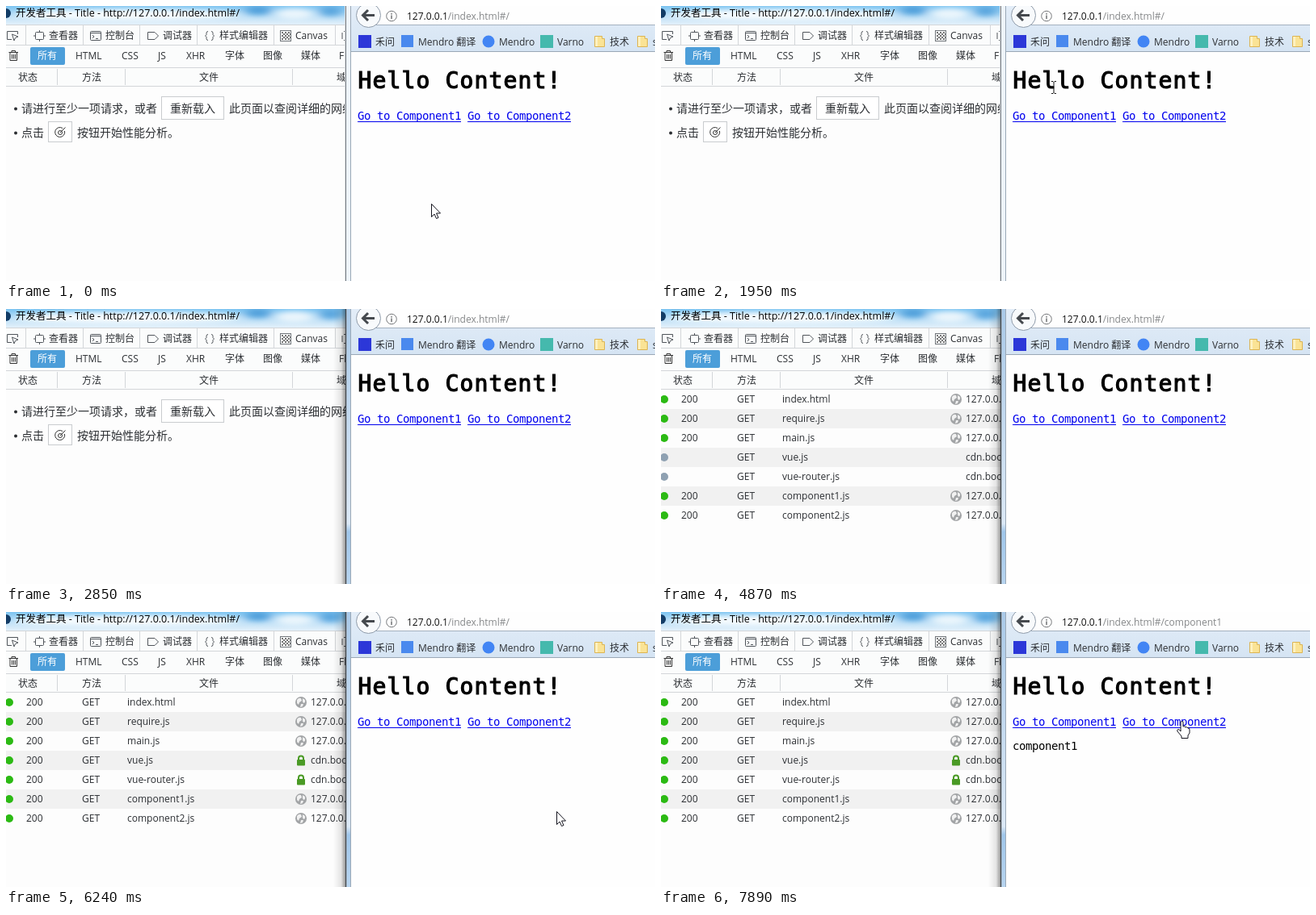
An HTML page that plays this animation: 803x341 px, repeating every 8000 ms.

```html
<!DOCTYPE html>
<html lang="zh-CN">
<head>
<meta charset="utf-8">
<title>Network panel</title>
<style>
html, body { margin: 0; width: 100%; height: 100%; overflow: hidden; background: #fdfdfd; }
svg { display: block; }
text { font: 12px 'Open Sans', 'Noto Sans CJK SC', sans-serif; fill: #2c2f33; white-space: pre; }
.tip text { font-size: 14px; }
.mono text { font: 14px 'DejaVu Sans Mono', monospace; letter-spacing: -.43px; fill: #000; }
.mono .h1 { font-size: 28px; letter-spacing: 1.14px; stroke: #000; stroke-width: 1.2px; }
.mono .link { fill: #0000ee; }
.line { fill: none; stroke: #50555b; }
.sep { stroke: #d3d6d9; fill: none; }
</style>
</head>
<body>
<svg width="803" height="341" viewBox="0 0 803 341">
  <defs>
    <clipPath id="leftClip"><rect width="421" height="341"/></clipPath>
    <clipPath id="barClip"><rect width="421" height="24"/></clipPath>
    <filter id="blur" x="-50%" y="-100%" width="200%" height="300%"><feGaussianBlur stdDeviation="7 3"/></filter>
    <linearGradient id="glass" x2="0" y2="1"><stop stop-color="#7cc4f1"/><stop offset=".6" stop-color="#c3e2f7"/><stop offset="1" stop-color="#e6f2fb"/></linearGradient>
    <linearGradient id="bar" x2="0" y2="1"><stop stop-color="#e3edf8"/><stop offset="1" stop-color="#d5e4f3"/></linearGradient>
    <linearGradient id="shade"><stop stop-color="#000" stop-opacity="0"/><stop offset=".6" stop-color="#000" stop-opacity=".1"/><stop offset="1" stop-color="#000" stop-opacity=".45"/></linearGradient>
    <linearGradient id="edge" x2="0" y2="1"><stop stop-color="#a9c9e8"/><stop offset=".78" stop-color="#dce9f6"/><stop offset=".81" stop-color="#9fc6ea"/><stop offset="1" stop-color="#b7d4ef"/></linearGradient>
    <g id="globe">
      <circle r="7" fill="#a2a4a6"/>
      <path d="M-5-3Q-3-6 0-5L1-2-2 0-3 3-5 1ZM2-5 5-3 5 0 3 1 2-1ZM0 2 3 2 2 5-1 6Z" fill="#f1f1f1"/>
    </g>
    <g id="lock">
      <path d="M-3 0V-2.5a3 3 0 0 1 6 0V0" fill="none" stroke="#4a9a25" stroke-width="2"/>
      <rect x="-5" y="-1" width="10" height="7.5" rx="1" fill="#4a9a25"/>
    </g>
    <g id="folder">
      <path d="M1.5 1.5H10.500V4.500H13.500V14.500H1.500Z" fill="#fae395" stroke="#dcb452"/>
      <path d="M2 2H5V14H2Z" fill="#fdf1c0"/>
    </g>
  </defs>

  <g clip-path="url(#leftClip)">
    <rect width="421" height="341" fill="#fdfdfd"/>
    <g clip-path="url(#barClip)">
      <rect width="421" height="24" fill="url(#glass)"/>
      <g filter="url(#blur)">
        <ellipse cx="150" cy="11" rx="140" ry="7" fill="#f6fbfe"/>
        <ellipse cx="312" cy="5" rx="16" ry="6" fill="#4f9fda"/>
        <ellipse cx="357" cy="10" rx="24" ry="7" fill="#eaf5fc"/>
        <ellipse cx="402" cy="6" rx="14" ry="7" fill="#5aa6de"/>
      </g>
      <circle cx="0" cy="9" r="6" fill="#123c66"/>
      <text x="12" y="12.500" style="fill:#000;font-size:12.5px">开发者工具 - Title - http://127.0.0.1/index.html#/</text>
    </g>

    <rect y="24" width="421" height="76" fill="#fbfcfc"/>
    <path class="sep" d="M0 23.5H421M0 48.5H421M0 76.5H421M0 99.5H421"/>
    <path class="sep" d="M24.5 24V48M95.5 24V48M165.5 24V48M236.5 24V48M331.5 24V48M407.5 24V48M63.5 78V98M147.5 78V98M354.5 78V98"/>
    <g class="line">
      <path d="M14.5 35V31.5H1.5V41.5H7M7.5 35 15 38 11.5 39.5 10 43Z"/>
      <rect x="36.5" y="32.5" width="10" height="9" rx="1"/>
      <path d="M41.5 30V33M41.5 41V44M34 37H37M46 37H49"/>
      <rect x="104.5" y="31.5" width="13" height="11" rx="1"/>
      <path d="M105 33.5H117M107 36 109 38 107 40M111 40.5H114"/>
      <path d="M175.5 32.5H184L188.5 37 184 41.5H175.5Z"/>
      <path d="M250 31.5Q248 31.5 248 33.5V35.5L246.5 37 248 38.5V40.5Q248 42.5 250 42.5M254 31.5Q256 31.5 256 33.5V35.5L257.5 37 256 38.5V40.5Q256 42.5 254 42.5"/>
      <rect x="339.5" y="30.5" width="13" height="13" stroke="#70757a"/>
      <path d="M341 33H352M341 37H352M341 41H352" stroke="#777" stroke-width="2" stroke-dasharray="2 2"/>
      <path d="M343 35H352M343 39H352" stroke="#777" stroke-width="2" stroke-dasharray="2 2"/>
      <path d="M416 33V41M418 31.5H421M418 42.5H421"/>
      <path d="M3.5 57.5H15M7 57V55.5H11.5V57M5 58V67.5H13.5V58M7.5 60V65.5M9.5 60V65.5M11.5 60V65.5" stroke="#333"/>
    </g>
    <rect x="30" y="51" width="43" height="22" rx="2" fill="#4c9ed9"/>
    <g id="labels"></g>

    <g id="tips" class="tip">
      <circle cx="12" cy="127.500" r="2" fill="#2c2f33"/><circle cx="12" cy="157.500" r="2" fill="#2c2f33"/>
      <text x="19" y="132">请进行至少一项请求，或者</text>
      <rect x="192.500" y="112.500" width="77" height="28" fill="#fff" stroke="#c9cccf"/>
      <text x="203" y="132">重新载入</text>
      <text x="276" y="132">此页面以查阅详细的网络</text>
      <text x="19" y="162">点击</text>
      <rect x="52.500" y="143.500" width="29" height="25" fill="#fff" stroke="#c9cccf"/>
      <g class="line" style="stroke:#333"><path d="M70 151.500A6 6 0 1 0 72.500 155M67 157 73.500 150.500"/><circle cx="67" cy="157" r="2.500"/></g>
      <text x="88" y="162">按钮开始性能分析。</text>
    </g>
    <g id="rows"></g>
  </g>

  <g id="idleEdge">
    <rect x="419" width="1" height="341" fill="#d9dcdf"/>
    <rect x="420" width="1" height="341" fill="#777d83"/>
    <rect x="421" width="6" height="341" fill="#eef4fa"/>
  </g>
  <g id="liveEdge">
    <rect x="405" width="16" height="341" fill="url(#shade)"/>
    <rect x="420" width="1.500" height="341" fill="#3d444b"/>
    <rect x="421.500" width="5.500" height="341" fill="url(#edge)"/>
  </g>

  <rect x="426" width="377" height="57" fill="url(#bar)"/>
  <rect x="427" y="56" width="376" height="285" fill="#fefefe"/>
  <path d="M426.500 0V341M426 56.500H803" stroke="#9aa8b6"/>
  <rect x="455" y="-5" width="360" height="28.500" fill="#fefefe" stroke="#a4b1bf"/>
  <circle cx="448.500" cy="11.500" r="15" fill="#f8fafc" stroke="#8f9baa"/>
  <path d="M456 11.500H442M448 5 441.500 11.500 448 18" fill="none" stroke="#45494e" stroke-width="3"/>
  <circle cx="477" cy="12.500" r="6.300" fill="none" stroke="#77797c"/>
  <path d="M477 9V10.500M477 11.500V16" stroke="#66686b" stroke-width="1.400"/>
  <text x="496" y="17" style="fill:#111">127.0.0.1<tspan id="path" fill="#858789"></tspan></text>

  <rect x="436" y="36" width="16" height="16" fill="#2c37d8"/>
  <rect x="489" y="36" width="15" height="15" fill="#4a89ee"/>
  <circle cx="597" cy="44" r="7.500" fill="#4285f4"/>
  <rect x="661" y="36" width="16" height="16" fill="#45b9ad"/>
  <use href="#folder" x="727" y="36"/><use href="#folder" x="780" y="36"/>
  <g id="marks"></g>

  <g class="mono">
    <text class="h1" x="435.500" y="102">Hello Content!</text>
    <text class="link" x="435" y="141">Go to Component1</text>
    <text class="link" x="571" y="141">Go to Component2</text>
    <path d="M435 143.500H563M571 143.500H699" stroke="#0000ee"/>
    <text id="view" x="435" y="171">component1</text>
  </g>

  <g id="pointer">
    <path id="arrow" d="M.5.5V16.500L4 13 6.500 18.500 9 17.500 6.500 12H11.500Z" fill="#fff" stroke="#15151f"/>
    <path id="beam" d="M-3-7.500H-1L0-6.500 1-7.500H3M0-6.500V6.500M-3 7.500H-1L0 6.500 1 7.500H3" fill="none" stroke="#111"/>
    <path id="hand" d="M5 13V2Q5 .5 6.500.5T8 2V7Q10 6 11 8 13 7 14 9 16 8.500 16 11V15L14 18V21.500H6V19L1 13Q0 11 2 10.500Q3.500 10.500 5 13Z" fill="#fff" stroke="#15151f"/>
  </g>
</svg>
<script>
const LOOP = 8000;
const LIST = 4870, CDN_DONE = 5020, FOCUS = 2400, ROUTE = 6840;
const $ = id => document.getElementById(id);
const show = (id, on) => $(id).setAttribute('display', on ? 'inline' : 'none');

function add(parent, tag, attrs, content = '') {
  const el = document.createElementNS('http://www.w3.org/2000/svg', tag);
  for (const key in attrs) el.setAttribute(key, attrs[key]);
  el.textContent = content;
  return parent.appendChild(el);
}
const labels = (parent, y, list) => list.forEach(([x, s]) => add(parent, 'text', { x, y }, s));

labels($('labels'), 41, [[53, '查看器'], [123, '控制台'], [194, '调试器'], [264, '样式编辑器'], [358, 'Canvas']]);
labels($('labels'), 66, [[39, '所有'], [86, 'HTML'], [143, 'CSS'], [188, 'JS'], [223, 'XHR'],
  [271, '字体'], [318, '图像'], [365, '媒体'], [412, 'Flash']]);
labels($('labels'), 93, [[15, '状态'], [94, '方法'], [239, '文件'], [409, '域']]);
$('labels').children[5].style.fill = '#fff';
labels($('marks'), 49, [[457, '禾问'], [510, 'Mendro 翻译'], [610, 'Mendro'], [682, 'Varno'], [747, '技术'], [800, 's']]);

const files = ['index.html', 'require.js', 'main.js', 'vue.js', 'vue-router.js', 'component1.js', 'component2.js'];
const pending = [];
files.forEach((file, i) => {
  const y = 100 + i * 24, cdn = file.startsWith('vue'), g = $('rows');
  add(g, 'rect', { y, width: 421, height: 24, fill: i % 2 ? '#f1f1f1' : '#fdfdfd' });
  const dot = add(g, 'circle', { cx: 4, cy: y + 12, r: 5, fill: '#2cba14' });
  const code = add(g, 'text', { x: 25, y: y + 16 }, '200');
  const icon = add(g, 'use', { href: cdn ? '#lock' : '#globe', x: 365, y: y + 12 });
  labels(g, y + 16, [[94, 'GET'], [150, file], [377, cdn ? 'cdn.bootcss.com' : '127.0.0.1']]);
  if (cdn) pending.push({ dot, code, icon });
});

// start time, x, y, pointer kind
const moves = [
  [0, 526, 245, 'arrow'], [740, 538, 250, 'arrow'], [890, 551, 257, 'arrow'],
  [1350, 684, 304, 'arrow'], [1500, 631, 230, 'arrow'], [1650, 549, 174, 'arrow'],
  [1800, 510, 146, 'arrow'], [1950, 486, 101, 'beam'], [2100, 452, 62, 'arrow'],
  [2250, 433, 34, 'arrow'], [2400, 600, 110, 'arrow'], [2550, 735, 165, 'arrow'],
  [2700, 730, 290, 'arrow'], [2850, 0, 0, ''],
  [5320, 762, 322, 'arrow'], [5470, 722, 280, 'arrow'], [5620, 685, 246, 'arrow'],
  [6240, 681, 247, 'arrow'], [6390, 640, 198, 'arrow'], [6540, 568, 152, 'arrow'],
  [6690, 520, 133, 'hand'], [6840, 518, 133, 'hand'], [6990, 525, 181, 'arrow'],
  [7140, 545, 220, 'arrow'], [7290, 590, 252, 'arrow'], [7440, 650, 260, 'arrow'],
  [7590, 680, 235, 'arrow'], [7740, 668, 182, 'arrow'], [7890, 638, 135, 'hand']
];

function draw(t) {
  const [, x, y, kind] = moves.findLast(m => m[0] <= t);
  $('pointer').setAttribute('transform', `translate(${x} ${y})`);
  ['arrow', 'beam', 'hand'].forEach(k => show(k, k === kind));

  show('idleEdge', t < FOCUS);
  show('liveEdge', t >= FOCUS);
  show('tips', t < LIST);
  show('rows', t >= LIST);
  const done = t >= CDN_DONE;
  for (const { dot, code, icon } of pending) {
    dot.setAttribute('fill', done ? '#2cba14' : '#8fa1b2');
    code.style.opacity = icon.style.opacity = done ? 1 : 0;
  }
  show('view', t >= ROUTE);
  $('path').textContent = '/index.html#/' + (t >= ROUTE ? 'component1' : '');
}

const start = performance.now();
function tick() {
  draw((performance.now() - start) % LOOP);
  requestAnimationFrame(tick);
}
tick();
</script>
</body>
</html>
```
